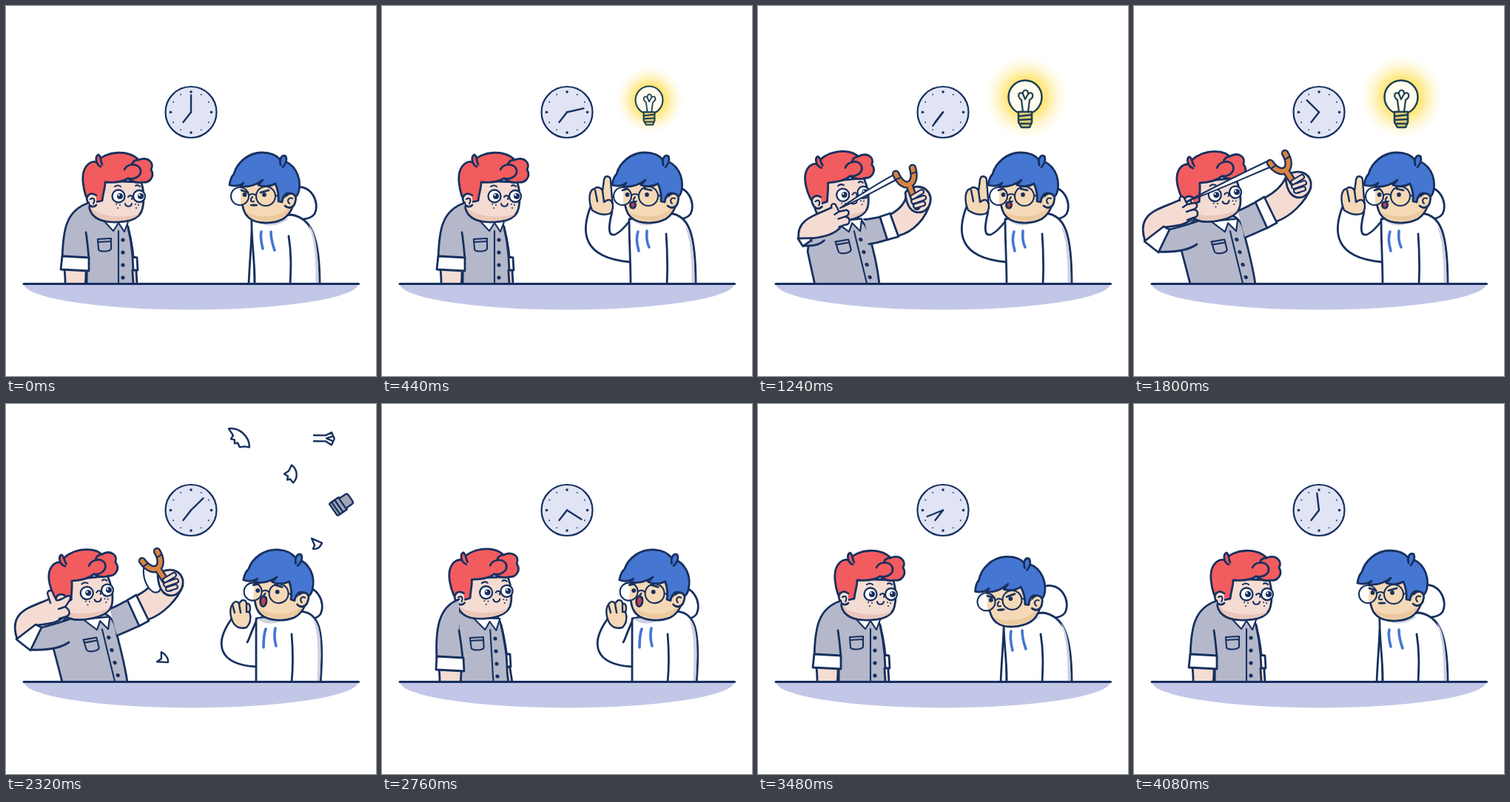
Write an HTML page that moves like this. It is 500x500 px and loops after 4120 ms.

```html
<!DOCTYPE html>
<html lang="en">
<head>
<meta charset="utf-8">
<title>Bright idea</title>
<style>
html, body { margin: 0; width: 100%; height: 100%; overflow: hidden; background: #fff; }
svg { display: block; width: 100vw; height: 100vh; }
.ink { fill: none; stroke: #17305f; stroke-width: 2.8; stroke-linecap: round; stroke-linejoin: round; }
.thin { stroke-width: 2.1; }
.flat { stroke: none; }
.navy { fill: #17305f; stroke: none; }
.white { fill: #fff; }
.grey { fill: #b4b8ca; }
.rose { fill: #f5dcd2; }
.peach { fill: #f5d9b6; }
.red { fill: #f25c5f; }
.blue { fill: #4576d1; }
</style>
</head>
<body>
<svg viewBox="0 0 500 500" class="ink">
  <defs>
    <radialGradient id="glowFill">
      <stop offset=".3" stop-color="#ffe058"/>
      <stop offset=".5" stop-color="#ffe46e" stop-opacity=".8"/>
      <stop offset=".75" stop-color="#ffea90" stop-opacity=".35"/>
      <stop offset="1" stop-color="#fff0b0" stop-opacity="0"/>
    </radialGradient>
    <clipPath id="aboveTable"><path d="M0 0H500V375H0Z"/></clipPath>
  </defs>

  <path class="flat" fill="#c3c7e7" d="M24 375A226 35.500 0 0 0 476 375Z"/>

  <g id="clock">
    <circle cx="250" cy="143.500" r="34.500" fill="#e0e4f4" stroke-width="2.200"/>
    <g id="dots" class="navy"></g>
    <path d="M250 143.500L239.500 157" stroke-width="2.400"/>
    <path id="minute" d="M250 143.500V120.500" stroke-width="2.400"/>
  </g>

  <g id="bulb">
    <circle class="flat" cx="362" cy="123" r="56" fill="url(#glowFill)"/>
    <g stroke="#1f4150" stroke-width="2.500">
      <path fill="#fffdf0" d="M352 144C346 142 338.500 134 338.500 123A22.500 22.500 0 0 1 383.500 123C383.500 134 376 142 370 144Z"/>
      <path stroke-width="2.200" d="M358 143L356 127C349 122 353 114 358 119C358 112 365 112 365 119C370 114 375 122 367 127L365 143M358 119L361 126L365 119"/>
      <path fill="#e3d27c" d="M352 143H370V157L367 164H356L352 157Z"/>
      <path d="M352 149L370 147M352 154L370 153M354 159H368"/>
    </g>
  </g>

  <g clip-path="url(#aboveTable)">
    <g id="red">
      <path id="redTorso" class="grey"/>
      <g id="redFront">
        <path d="M152 304V376" class="thin"/>
        <g class="navy"><circle cx="158" cy="316" r="2.600"/><circle cx="158" cy="333" r="2.600"/><circle cx="158" cy="350" r="2.600"/><circle cx="158" cy="367" r="2.600"/></g>
        <path class="thin" d="M124 315L142 314V328C141 332 127 333 125 329ZM124 319L142 318"/>
        <path class="white thin" d="M130 288L145 304L152 293L160 305L166 289Z"/>
      </g>
      <g id="farSleeve" class="grey"></g>
      <g id="farForearm" class="rose"></g>
      <path id="farCuff" class="white"/>
      <g id="redHead">
        <path class="rose" d="M130 236L183 238C187 252 187 268 183 278C177 290 160 292 147 292C122 292 112 282 112 266L120 245Z"/>
        <path class="flat" fill="#eac7ba" d="M114 272C117 285 130 290.500 147 290.500C163 290.500 174 288 180 281C163 287 127 286 114 272Z"/>
        <path class="red" d="M126 264C119 266 112 263 108 257C104 245 102 230 106 221C110 212 117 209 123 211C134 195 168 194 179 208C192 203 201 212 196 221C202 231 193 240 184 238C176 240 168 236 165 233C157 238 146 239 134 238C134 246 131 254 130 263Z"/>
        <path d="M160 221C164 212 180 212 182 222C183 230 174 235 165 233M179 208C174 208 171 211 170 214"/>
        <path id="redTuft" class="red" d="M128 217C121 214 120 203 125 201C129 203 127 209 130 214"/>
        <path class="rose" d="M122 256C114 250 107 257 110 264C112 271 118 273 122 269"/>
        <path class="thin" d="M114 261C119 258 121 262 118 267"/>
        <g class="white" stroke-width="2.300"><circle cx="152" cy="257" r="8.500"/><circle cx="180" cy="257" r="8"/></g>
        <g class="navy"><circle cx="154" cy="257" r="4"/><circle cx="182" cy="257" r="4"/>
          <circle cx="149" cy="268" r="1"/><circle cx="154" cy="269" r="1"/><circle cx="151" cy="273" r="1"/><circle cx="175" cy="268" r="1"/><circle cx="179" cy="269" r="1"/><circle cx="176" cy="273" r="1"/></g>
        <g class="white flat"><circle cx="152.500" cy="255.500" r="1.200"/><circle cx="180.500" cy="255.500" r="1.200"/></g>
        <path class="thin" d="M147 244Q151 241 155 244M175 243Q178 241 181 244M165 258C168 254 173 257 170 261M161 267C162 272 169 272 170 267"/>
      </g>
      <g id="nearSleeve" class="grey"></g>
      <g id="nearForearm" class="rose"></g>
      <path id="nearCuff" class="white"/>
      <path id="elastic" class="white thin"/>
      <g id="nearHand" class="rose" stroke-width="2.400">
        <g id="grip">
          <path class="flat" d="M160 302L174 291L186 312L164 332Z"/>
          <path d="M172 292C178 282 188 284 190 288C198 288 197 294 194 297C199 300 196 306 192 306C196 310 190 316 184 313C180 320 174 321 170 324M178 293L190 288M181 301L194 297M181 308L192 306"/>
        </g>
        <g id="pinch">
          <path d="M62 263C60 258 66 255 68 260L72 268L82 266C87 268 86 273 80 275L84 276C88 280 86 286 80 286L72 289M72 268L66 272M80 275L71 278"/>
        </g>
        <g id="release">
          <path d="M60 269L56 256C57 250 63 251 64 257L68 265C76 267 82 256 87 260C88 266 82 270 80 274C86 278 88 284 82 287L72 290M80 274L71 277"/>
        </g>
      </g>
      <g id="farFist" class="rose"><path d="M205 232C212 221 235 220 239 238C240 247 236 255 228 258C214 262 206 250 205 232Z"/></g>
      <g id="sling">
        <path d="M-12 -22C-11 4 11 4 12 -22M0 -2V29" stroke-width="10.500"/>
        <path d="M-12 -22C-11 4 11 4 12 -22M0 -2V29" stroke="#d9843f" stroke-width="5.800"/>
        <path d="M-15 -15H-8M8 -15H15" class="thin"/>
      </g>
      <g id="farFingers">
        <path d="M215 238L227 231M216 244L230 239M219 250L229 247" stroke-width="8"/>
        <path d="M215 238L227 231M216 244L230 239M219 250L229 247" stroke="#f5dcd2" stroke-width="3.800"/>
      </g>
    </g>

    <g id="blue">
      <path id="hood" class="white" d="M390 245C411 240 425 264 417 281C410 290 395 289 380 287"/>
      <g id="blueArm" class="white"></g>
      <path id="blueTorso" class="white"/>
      <path id="blueShade" class="flat" fill="#cdd1df"/>
      <path id="blueSeam"/>
      <path class="flat" fill="#cdd1df" d="M340 290C348 299 368 299 382 287Z"/>
      <path id="strings" stroke="#4576d1" stroke-width="3.600"/>
      <g id="blueHead">
        <path class="peach" d="M317 240L392 240C392 262 388 280 374 288C360 295 338 295 328 286C320 280 317 262 317 240Z"/>
        <path class="flat" fill="#ecc99f" d="M323 277C331 293 362 294 376 284C385 277 387 269 388 265C378 287 340 289 323 277Z"/>
        <circle class="white flat" cx="316" cy="257" r="12"/>
        <path class="peach flat" d="M317 245A12 12 0 0 1 317 269Z"/>
        <g class="thin"><circle cx="316" cy="257" r="12"/><circle cx="351" cy="257" r="13"/></g>
        <path class="thin" d="M328 256Q333 252 338 256M364 256L376 259"/>
        <g class="navy"><circle cx="322.500" cy="255" r="2.900"/><circle cx="349" cy="255" r="2.900"/></g>
        <path class="thin" d="M333 258C329 263 331 265 335 264"/>
        <ellipse id="mouth" cx="334" cy="269" fill="#c2414f"/>
        <path class="blue" d="M302 242C303 234 305 230 308 227C312 212 327 198 346 198C358 198 366 202 371 208C390 212 399 230 396 249C394 257 390 262 386 254C377 250 374 258 373 265L368 264C369 254 367 247 364 240C357 244 350 245 341 242L347 235C338 242 328 245 317 244L321 239C316 243 309 244 302 242Z"/>
        <path class="blue" d="M371 215C369 206 373 200 378 203C380 207 378 213 374 218"/>
        <path id="brows"/>
        <path class="peach" d="M378 257C386 249 394 256 391 264C390 272 382 275 377 270"/>
        <path class="thin" d="M387 260C382 258 379 263 383 267"/>
      </g>
      <g id="pointHand" class="peach" stroke-width="2.400">
        <path d="M284 276C278 262 280 248 287 247C291 243 297 246 298 250L300 235C301 228 309 229 309 236L311 262C313 270 312 276 309 280C300 284 290 280 284 276Z"/>
        <path d="M288 249L291 264M298 250L300 265M300 265C306 260 310 262 311 266"/>
      </g>
      <g id="shockHand" class="peach" stroke-width="2.400">
        <path d="M308 297C301 285 303 274 306 271C309 265 314 267 315 270C319 262 325 265 325 270C330 268 331 276 329 281C332 289 330 297 325 302C318 304 312 302 308 297Z"/>
        <path d="M306 271L309 282M315 270L317 282M325 270L325 281M325 281L329 281"/>
      </g>
    </g>
    <g id="shards"></g>
  </g>

  <path d="M24 375.500H476.500" stroke-width="3"/>
</svg>
<script>
const LOOP = 4120, BURST = 1940;
const $ = id => document.getElementById(id);
const NUMBER = /-?\d*\.?\d+/g;
const tracks = [];

function make(parent, tag, attrs) {
  const el = document.createElementNS('http://www.w3.org/2000/svg', tag);
  for (const name in attrs) el.setAttribute(name, attrs[name]);
  return parent.appendChild(el);
}

// Blends every number of two equally structured strings.
function blend(a, b, k) {
  const ends = b.match(NUMBER);
  let i = 0;
  return a.replace(NUMBER, v => (+v + (ends[i++] - v) * k).toFixed(3));
}

function valueAt(keys, t) {
  const next = keys.findIndex(key => key[0] > t);
  if (next < 1) return keys[next ? keys.length - 1 : 0][1];
  const [t0, a] = keys[next - 1], [t1, b] = keys[next];
  const k = (t - t0) / (t1 - t0);
  return blend(a, b, k * k * (3 - 2 * k));
}

const RED = [[0, 'idle'], [600, 'idle'], [780, 'hold'], [1060, 'hold'], [1360, 'aim'],
  [2440, 'aim'], [2680, 'lean'], [2840, 'lean'], [3040, 'idle']];
const BLUE = [[0, 'idle'], [200, 'idle'], [420, 'point'], [1950, 'point'], [2080, 'shock'],
  [2820, 'shock'], [3240, 'sad'], [3560, 'sad'], [3880, 'idle']];

const keysFor = (schedule, poses) => schedule.map(([t, name]) => [t, poses[name] ?? poses.idle]);
function pose(id, attr, schedule, poses) {
  tracks.push([$(id), attr, keysFor(schedule, poses)]);
}

// A limb has two edges; its fill joins them, its outline leaves the ends open.
function limb(id, schedule, poses) {
  const keys = keysFor(schedule, poses);
  tracks.push([make($(id), 'path', { class: 'flat' }), 'd', keys.map(([t, d]) => [t, d.replace(' M', ' L') + 'Z'])]);
  tracks.push([make($(id), 'path', { fill: 'none' }), 'd', keys]);
}

pose('redTorso', 'd', RED, {
  idle: 'M109 376 C110 350 108 330 106 300 C104 272 112 268 125 268 C145 268 160 285 165 299 C172 325 174 350 173 376 Z',
  lean: 'M106 376 C107 350 106 330 103 300 C100 272 108 268 120 268 C142 268 158 285 161 299 C168 325 170 350 172 376 Z',
  hold: 'M78 376 C76 360 74 350 73 335 C74 300 84 280 100 280 C125 280 140 290 150 305 C160 330 163 355 164 376 Z',
  aim: 'M76 376 C72 360 68 345 64 330 C70 285 90 280 110 285 C135 275 148 290 150 312 C156 335 161 355 164 376 Z'
});
pose('redFront', 'transform', RED, {
  idle: 'matrix(1 0 0 1 0 0)',
  lean: 'matrix(1 0 .06 1 -24 1)',
  hold: 'matrix(1 -.12 .243 1 -96 18.5)',
  aim: 'matrix(1 -.12 .243 1 -96 18.5)'
});
pose('redHead', 'transform', RED, {
  idle: 'translate(0 0) rotate(0 148 262)',
  lean: 'translate(-11 -2) rotate(-4 148 262)',
  hold: 'translate(-26.5 -1.5) rotate(-6 148 262)',
  aim: 'translate(-42 -1) rotate(-8 148 262)'
});
limb('nearSleeve', RED, {
  idle: 'M76 342 C77 305 80 276 112 266 M108 306 C110 318 111 330 112 342',
  lean: 'M74 344 C72 305 76 274 104 264 M104 306 C106 318 108 330 109 344',
  hold: 'M118 346 C50 346 62 288 88 277 M98 307 C105 308 110 309 116 309',
  aim: 'M48 302 C60 299 72 296 88 290 M85 322 C72 331 52 333 33 332'
});
limb('nearForearm', RED, {
  idle: 'M79 357 C80 363 80 370 80 376 M107 376 C108 370 108 364 108 358',
  lean: 'M77 359 C78 364 78 370 78 376 M106 376 C107 370 107 364 107 360',
  hold: 'M133 342 C150 340 165 332 171 323 M173 291 C160 297 145 304 130 308',
  aim: 'M42 299 C55 297 70 297 80 286 M62 262 C35 275 2 278 15 318'
});
pose('nearCuff', 'd', RED, {
  idle: 'M76 338 L112 340 L112 358 L74 356 Z',
  lean: 'M74 341 L110 343 L111 361 L73 359 Z',
  hold: 'M114 346 L113 309 L129 307 L134 343 Z',
  aim: 'M48 302 L33 333 L14 318 L40 298 Z'
});
limb('farSleeve', RED, {
  idle: 'M165 299 C168 312 170 326 171 338 M171 338 C170 326 168 312 165 299',
  lean: 'M161 299 C164 312 166 326 168 338 M168 338 C166 326 164 312 161 299',
  hold: 'M150 338 C155 343 160 345 166 345 M165 323 C160 320 155 316 150 310',
  aim: 'M150 313 C160 309 168 305 180 300 M165 265 C158 268 150 273 140 277'
});
limb('farForearm', RED, {
  idle: 'M171 357 C171 363 172 370 172 376 M177 376 C177 370 176 364 176 357',
  lean: 'M169 357 C169 363 170 370 171 376 M176 376 C175 370 174 364 173 357',
  hold: 'M184 347 C205 346 218 330 221 302 M193 300 C196 312 190 320 183 324',
  aim: 'M193 291 C212 284 232 265 239 245 M205 232 C200 243 190 252 177 259'
});
pose('farCuff', 'd', RED, {
  idle: 'M171 339 L177 340 L178 357 L172 357 Z',
  lean: 'M168 338 L173 338 L174 355 L169 355 Z',
  hold: 'M165 346 L166 322 L183 322 L184 347 Z',
  aim: 'M180 300 L164 265 L176 258 L193 293 Z'
});
for (const id of ['farFist', 'farFingers']) pose(id, 'transform', RED, {
  idle: 'translate(-40 190)', hold: 'translate(-17 58)', aim: 'translate(0 0)'
});
pose('sling', 'transform', RED, {
  idle: 'translate(180 412) rotate(5)',
  hold: 'translate(203 280) rotate(5)',
  aim: 'translate(206 224) rotate(-33)'
});
const band = {
  idle: 'M170 395 C158 403 156 418 162 423 C166 418 166 408 172 398',
  hold: 'M192 261 C180 270 178 285 184 290 C188 285 188 275 194 265',
  aim: 'M184 208 C150 224 110 244 72 264 C112 249 150 232 188 216',
  slack: 'M187 218 C183 232 190 249 199 254 C209 257 212 248 207 232'
};
pose('elastic', 'd', [[0, 'idle'], [600, 'idle'], [780, 'hold'], [1060, 'hold'], [1360, 'aim'],
  [1880, 'aim'], [1930, 'slack'], [2440, 'slack'], [2680, 'idle']], band);
pose('grip', 'transform', RED, { idle: 'translate(-90 110)', hold: 'translate(0 0)', aim: 'translate(-108 -28)' });
for (const id of ['pinch', 'release']) pose(id, 'transform', RED, {
  idle: 'translate(22 130)', hold: 'translate(108 28)', aim: 'translate(0 0)'
});
tracks.push([$('redTuft'), 'transform', [[3420, 'rotate(0 128 216)'], [3560, 'rotate(-6 128 216)'],
  [3700, 'rotate(4 128 216)'], [3840, 'rotate(0 128 216)']]]);

pose('blueHead', 'transform', BLUE, {
  idle: 'translate(0 0) rotate(0 350 265)',
  point: 'translate(9 0) rotate(0 350 265)',
  shock: 'translate(17 -1) rotate(4 350 265)',
  sad: 'translate(-7 8) rotate(-4 350 265)'
});
pose('hood', 'transform', BLUE, { idle: 'translate(0 0)', shock: 'translate(8 3)', sad: 'translate(-2 1)' });
limb('blueArm', BLUE, {
  idle: 'M328 376 C329 350 331 330 332 305 M334 305 C335 330 336 350 336 376',
  point: 'M283 268 C268 305 270 340 335 346 M335 290 C315 315 300 320 311 278',
  shock: 'M305 290 C280 325 288 352 338 355 M338 294 C332 306 328 320 326 322'
});
pose('blueTorso', 'd', BLUE, {
  idle: 'M336 376 C337 350 331 315 332 288 L385 282 C412 286 424 310 424 376 Z',
  point: 'M336 376 C336 350 334 315 334 288 L388 280 C414 282 424 305 424 376 Z',
  shock: 'M338 376 C338 350 338 315 338 290 L394 280 C422 280 431 300 425 376 Z'
});
pose('blueShade', 'd', BLUE, {
  idle: 'M422.500 374 C422 325 417 303 409 296 C417 314 419 345 418.500 374 Z',
  shock: 'M424 374 C428 315 424 296 414 289 C423 307 422 345 420.500 374 Z'
});
pose('blueSeam', 'd', BLUE, {
  idle: 'M382 311 C386 335 385 355 384 376',
  point: 'M384 308 C386 335 386 355 385 376',
  shock: 'M386 311 C388 335 388 355 386 376'
});
pose('strings', 'd', BLUE, {
  idle: 'M345 305 C343 312 345 320 347 328 M358 305 C358 314 360 322 363 330',
  point: 'M346 305 C343 312 344 320 347 331 M358 304 C357 314 358 320 361 326',
  shock: 'M351 304 C348 312 348 320 348 329 M364 303 C362 312 363 320 365 327',
  sad: 'M342 307 C340 316 342 325 344 333 M357 306 C357 314 359 323 362 331'
});
pose('brows', 'd', BLUE, {
  idle: 'M318 249 L327 252 M344 252 L355 249',
  point: 'M316 249 L323 247 M346 247 L355 249',
  shock: 'M316 248 L323 246 M346 246 L355 248'
});
pose('mouth', 'rx', BLUE, { idle: '4', point: '3.6', shock: '4.2' });
pose('mouth', 'ry', BLUE, { idle: '.2', point: '4.2', shock: '7' });
pose('mouth', 'cx', BLUE, { idle: '335', point: '330', shock: '331' });
pose('pointHand', 'transform', BLUE, { idle: 'translate(30 160)', point: 'translate(0 0)', shock: 'translate(20 20)' });
pose('shockHand', 'transform', BLUE, { idle: 'translate(12 125)', point: 'translate(-20 -20)', shock: 'translate(0 0)' });

for (let i = 0; i < 12; i++) {
  const a = i * Math.PI / 6;
  make($('dots'), 'circle', { cx: 250 + 27.5 * Math.sin(a), cy: 143.5 - 27.5 * Math.cos(a), r: i % 3 ? 0.9 : 1.8 });
}

// Each piece: shape, fill, place 0.38 s after the burst, spin in degrees per second.
const pieces = [
  ['M-14 -12C0 -14 14 -2 14 13L7 12L1 13L-2 7L-6 8L-6 3L-11 2L-8 -3Z', '#fff', 315, 45, 300],
  ['M1 -12C9 -6 10 5 3 12L-1 7L-5 8L-4 3L-9 0L-3 -4Z', '#fff', 385, 94, -380],
  ['M-14 -4H2L10 -8L12 -3C14 -1 14 2 12 4L10 9L2 4H-14M12 -3L3 0L12 4', 'none', 430, 46, 320],
  ['M-13 -8Q-14 -10 -10 -10H2L4 -8H12Q15 -8 15 -5V5Q15 8 12 8H4L2 10H-10Q-14 10 -13 8ZM-9 -9V9M-4 -9V9M2 -9V9', '#a3a7b5', 453, 135, 240, -35],
  ['M-6 -7L8 -1C6 4 2 8 -4 7L-2 2Z', '#fff', 419, 188, 420],
  ['M-2 -7C4 -4 8 2 7 7L-8 6L-2 2Z', '#fff', 212, 341, -300]
].map(([d, fill, x, y, spin, tilt = 0]) => ({
  el: make($('shards'), 'path', { d, fill, 'stroke-width': 2.4 }), x, y, spin, tilt
}));

function drawShards(s) {
  const gravity = 3000, seen = 0.38, drag = 5;
  for (const p of pieces) {
    const speed = (p.y - 125 - gravity * seen * seen / 2) / seen;
    const spread = (1 - Math.exp(-drag * s)) / (1 - Math.exp(-drag * seen));
    const x = 361 + (p.x - 361) * spread;
    const y = 125 + speed * s + gravity * s * s / 2;
    p.el.setAttribute('transform', `translate(${x} ${y}) rotate(${p.tilt + p.spin * (s - seen)})`);
  }
}

const show = (id, on) => $(id).setAttribute('visibility', on ? 'visible' : 'hidden');

function draw(t) {
  for (const [el, attr, keys] of tracks) el.setAttribute(attr, valueAt(keys, t));
  $('minute').setAttribute('transform', `rotate(${720 * t / LOOP} 250 143.5)`);

  const pop = Math.min(1, Math.max(0, (t - 380) / 140));
  const size = 1 - (1 - pop) ** 3;
  $('bulb').setAttribute('transform', `translate(361 145) scale(${size}) translate(-361 -145)`);
  show('bulb', pop > 0 && t < BURST);
  show('shards', t >= BURST && t < 2760);
  drawShards((t - BURST) / 1000);

  show('grip', t > 600 && t < 1200);
  show('pinch', t >= 1200 && t < 1900);
  show('release', t >= 1900 && t < 2680);
  show('pointHand', t < 2010);
  show('shockHand', t >= 2010);
}

const start = performance.now();
(function tick() {
  draw((performance.now() - start) % LOOP);
  requestAnimationFrame(tick);
})();
</script>
</body>
</html>
```
